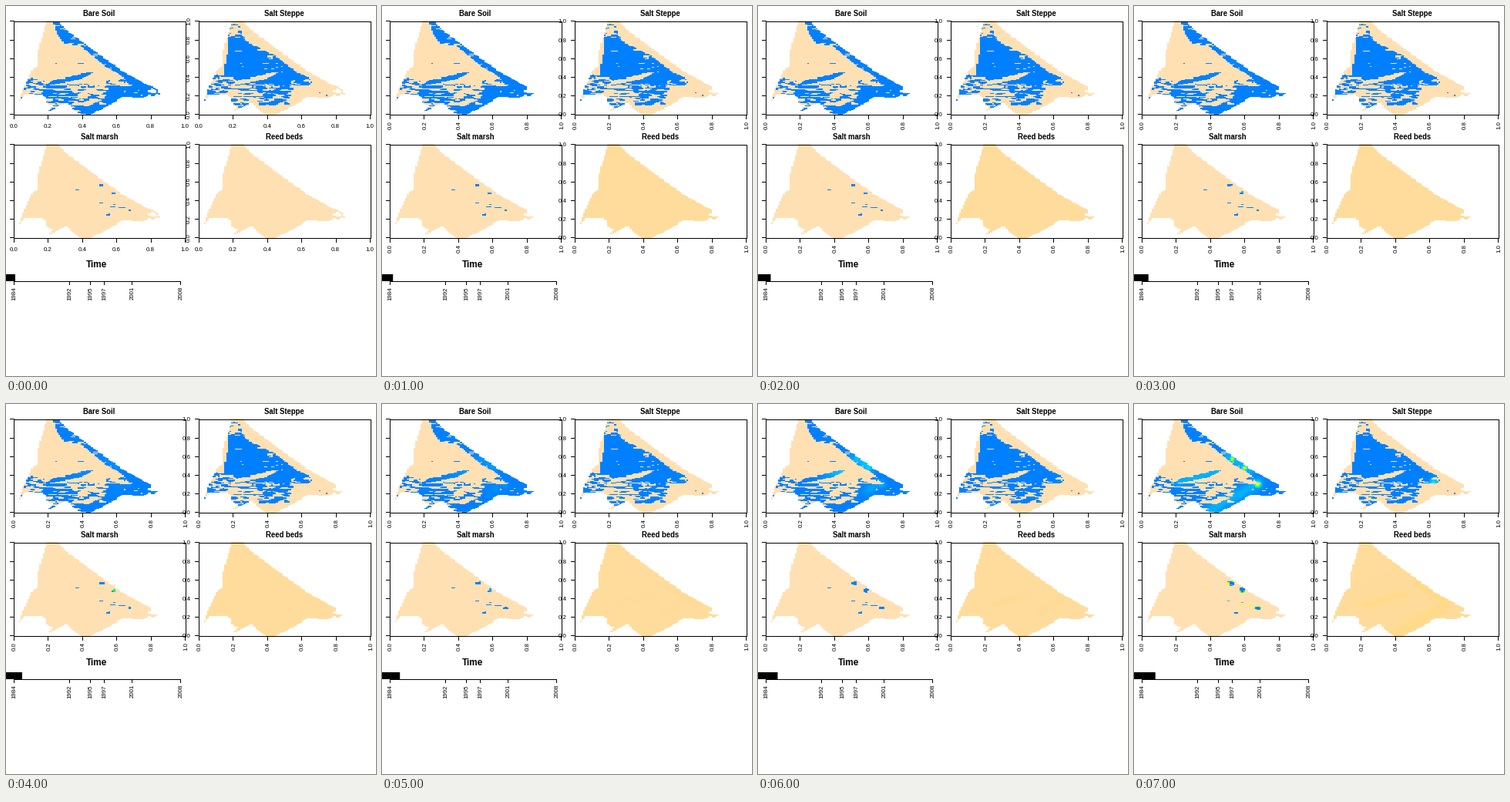
A matplotlib script for the animation above (8000 ms loop, 480 by 480 pixels).

```python
import numpy as np
import matplotlib
import matplotlib.pyplot as plt
from matplotlib.animation import FuncAnimation
from matplotlib.patches import Rectangle
from matplotlib.path import Path

matplotlib.rcParams["font.family"] = "Liberation Sans"

PT = 0.75            # points per pixel at 96 dpi
STEPS, STEP_MS = 8, 1000
N = 100              # raster cells per side
LEFT, RIGHT, TOP, BOTTOM = 9.5, 232.5, 19, 141
PANELS = [("Bare Soil", 0, 0), ("Salt Steppe", 240, 0),
          ("Salt marsh", 0, 160), ("Reed beds", 240, 160)]
YEARS = [1984, 1992, 1995, 1997, 2001, 2008]


def rgb(code):
    return np.array(matplotlib.colors.to_rgb(code))


SAND, REED, REED_DENSE = rgb("#ffe0b3"), rgb("#ffdc9c"), rgb("#ffd980")

# Heat ramp from blue through cyan and green to yellow
RAMP = np.array([rgb(c) for c in ("#0080ff", "#00e5ff", "#00ff4d", "#e6ff00", "#ffff00")])
RAMP_AT = [0, 0.3, 0.5, 0.75, 1]

fig = plt.figure(figsize=(5, 5), dpi=96, facecolor="white")
ax = fig.add_axes([0, 0, 1, 1])

# Cell centres in pixels of the first panel
cell_w, cell_h = (RIGHT - LEFT) / N, (BOTTOM - TOP) / N
X, Y = np.meshgrid(LEFT + (np.arange(N) + 0.5) * cell_w,
                   TOP + (np.arange(N) + 0.5) * cell_h)
CELLS = np.column_stack([X.ravel(), Y.ravel()])


def area(*points):
    return Path(points).contains_points(CELLS).reshape(N, N)


def band(x0, y0, x1, y1, width):
    """Soft ridge along a segment, 1 on the line."""
    dx, dy = x1 - x0, y1 - y0
    t = np.clip(((X - x0) * dx + (Y - y0) * dy) / (dx * dx + dy * dy + 1e-9), 0, 1)
    dist = np.hypot(X - x0 - t * dx, Y - y0 - t * dy)
    return np.exp(-(dist / width) ** 2)


def blob(x, y, radius):
    return band(x, y, x, y, radius)


def highest(*fields):
    return np.maximum.reduce(fields)


def streaks(seed):
    """Uniform noise, correlated mostly along rows."""
    raw = np.random.RandomState(seed).normal(size=(N, N + 4))
    soft = sum(raw[:, k:k + N] * w for k, w in enumerate([0.6, 1, 1, 1, 0.6]))
    soft = soft + 0.45 * np.roll(soft, 1, axis=0)
    return soft.ravel().argsort().argsort().reshape(N, N) / N ** 2


def heat_rgb(heat):
    return np.stack([np.interp(heat, RAMP_AT, RAMP[:, c]) for c in range(3)], axis=-1)


def paint(mask, heat, ground):
    return np.where(mask[..., None], heat_rgb(heat), ground)


land = area(
    (53, 18), (65, 18), (76, 30), (95, 44), (119, 62), (150, 84), (187, 105),
    (187, 109), (184, 110), (185, 112), (192, 113), (198, 113), (191, 117),
    (186, 115), (178, 119), (151, 118), (133, 129), (107, 142), (97, 141),
    (84, 132), (80, 126), (75, 127), (63, 133), (52, 138), (61, 130),
    (53, 126), (51, 118), (46, 115), (23, 116), (17, 123), (20, 112),
    (33, 83), (41, 78), (41, 59), (47, 39))
spit = highest(band(187, 105, 195, 109, 1.4), band(195, 109, 197, 114, 1.4)) > 0.45

# Chance of cover per cell, later zones overriding earlier ones
bare_p, steppe_p = np.zeros((2, N, N))


def fill(chances, value, *points):
    chances[area(*points)] = value


fill(bare_p, 0.36, (14, 125), (24, 93), (48, 92), (52, 122))
fill(bare_p, 0.56, (45, 104), (78, 103), (100, 118), (100, 142), (45, 142))
fill(bare_p, 0.28, (78, 100), (135, 102), (140, 122), (98, 124))
fill(bare_p, 0.42, (130, 94), (162, 95), (164, 106), (130, 107))
fill(bare_p, 0.96, (48, 104), (62, 96), (100, 87), (113, 86), (96, 95), (60, 102))
fill(bare_p, 0.90, (61, 21), (70, 22), (200, 104), (187, 112), (160, 102),
     (148, 89), (128, 78), (95, 51), (75, 49), (65, 35))
fill(bare_p, 0.97, (132, 106), (160, 104), (166, 101), (200, 108), (200, 120),
     (152, 119), (110, 145), (84, 128), (106, 130), (128, 120))

fill(steppe_p, 0.72, (14, 125), (24, 92), (48, 84), (52, 122))
fill(steppe_p, 0.84, (45, 96), (146, 96), (142, 114), (125, 130), (82, 128), (45, 140))
fill(steppe_p, 0.16, (140, 96), (165, 98), (187, 114), (178, 121), (140, 121))
fill(steppe_p, 0.62, (52, 24), (60, 22), (70, 40), (70, 48), (46, 48))
fill(steppe_p, 0.98, (48, 42), (66, 40), (75, 48), (108, 64), (138, 87), (156, 93),
     (152, 101), (112, 103), (60, 98), (42, 86), (46, 66))

bare = streaks(5) < bare_p
for x, y in [(64, 75), (94, 74), (98, 75)]:
    bare |= (abs(X - x) < 2) & (abs(Y - y) < 0.7)
bare |= spit
steppe = (streaks(11) < steppe_p) & ~bare

# Marsh patches: left, top, width
marsh = np.zeros((N, N), bool)
for x, y, w in [(89, 77, 5), (121, 72, 4), (137, 82, 4), (121, 94.5, 4), (138, 97, 3),
                (135, 99, 5), (146, 100.5, 8), (158, 104, 4), (132, 109, 3), (129, 110, 5)]:
    marsh |= (X >= x) & (X < x + w) & (Y >= y) & (Y < y + 1.7)


def oval(x, y, rx, ry):
    return np.hypot((X - x) / rx, (Y - y) / ry)


# Relative distance from the nearest spreading marsh centre
spread = np.minimum.reduce([oval(125.5, 72.5, 4, 4), oval(140, 81.5, 3.5, 4.5),
                            oval(160, 104.5, 6, 2)])
REACH = [0, 0, 0, 0.3, 0.4, 0.5, 0.7, 1]
fresh = streaks(3)

streak = band(58, 101, 112, 87, 6)
shore = band(122, 68, 150, 86, 7)
slope = band(98, 138, 160, 103, 8)
spots = highest(blob(127, 71.5, 4), blob(143, 83, 4), blob(160, 104, 5))
core = highest(blob(110, 88, 22), blob(138, 77, 14), blob(145, 107, 12))
reed_thin = highest(band(60, 102, 110, 87, 1.2), band(125, 112, 160, 90, 1.2),
                    band(135, 78, 160, 90, 1.2))
reed_wide = highest(streak, slope, band(125, 70, 165, 98, 6))


def bare_heat(step):
    if step == STEPS - 1:
        return highest(0.15 * highest(streak, shore, slope), 0.9 * spots ** 1.5)
    rise = [0, 0, 0, 0.02, 0.04, 0.07, 0.2][step]
    return rise * (highest(streak, shore, slope * 0.6) * core + 0.6 * spots)


def steppe_heat(step):
    return 0.3 * blob(148, 102, 5) * (step == 7) + 0.03 * blob(152, 100, 9) * (step >= 5)


def marsh_layer(step):
    grown = spread < REACH[step]
    if step == 7:
        heat = np.where(fresh < 0.55, np.clip(2.2 * (spread - 0.45), 0, 0.9), 0)
        heat = highest(heat, 0.25 * blob(123, 95, 2), 0.2 * blob(140, 98, 2))
    else:
        sprout = {3: 0.2, 4: 0.5, 5: 0.1}.get(step, 0)
        heat = sprout * (grown & (abs(X - 139.5) < 3))
    return paint(marsh | grown, heat, SAND)


def reed_layer(step):
    if step == 0:
        return np.broadcast_to(SAND, (N, N, 3))
    dense = {5: 0.2 * reed_thin, 6: 0.6 * reed_thin, 7: 0.65 * reed_wide}.get(step, 0 * X)
    return REED + dense[..., None] * (REED_DENSE - REED)


def layers(step):
    shown = land | spit if step == 0 else land
    maps = [paint(bare, bare_heat(step), SAND),
            paint(steppe, steppe_heat(step), SAND),
            marsh_layer(step),
            reed_layer(step)]
    return [np.where(shown[..., None], m, 1.0) for m in maps]


def line(xs, ys):
    ax.plot(xs, ys, color="black", lw=PT, solid_capstyle="projecting", zorder=3)


def label(x, y, text, size=7.92, **style):
    return ax.text(x, y, text, fontsize=size * PT, va="baseline",
                   rotation_mode="anchor", zorder=4, **style)


images, first_labels, later_labels = [], [], []
for title, ox, oy in PANELS:
    l, r, t, b = LEFT + ox, RIGHT + ox, TOP + 0.5 + oy, BOTTOM - 0.5 + oy
    images.append(ax.imshow(np.ones((N, N, 3)), extent=(l, r, BOTTOM + oy, TOP + oy),
                            interpolation="nearest", aspect="auto", zorder=1))
    line([l, r, r, l, l], [t, t, b, b, t])
    label(121 + ox, 13 + oy, title, 9.5, ha="center", weight="bold")
    for k in range(6):
        x, y, text = 10 + ox + 44.4 * k, 140.4 + oy - 24.2 * k, f"{k / 5:.1f}"
        line([x, x], [b, b + 5])
        line([l, l - 5], [y, y])
        first_labels += [label(x, b + 17.5, text, ha="center"),
                         label(l - 10.5, y, text, ha="center", rotation=90)]
        later_labels += [label(x + 3, b + 9, text, ha="right", rotation=90),
                         label(l - 10, y + 3, text, ha="right")]

label(117.5, 339, "Time", 11.7, ha="center", weight="bold")
line([9.5, 225.5], [356.5, 356.5])
for year in YEARS:
    x = 9.5 + 9 * (year - 1984)
    line([x, x], [356.5, 361])
    label(x + 3, 364, str(year), ha="right", rotation=90)

bar = Rectangle((0, 348), 12, 9, color="black", lw=0, snap=False, zorder=3)
ax.add_patch(bar)

ax.set_xlim(0, 480)
ax.set_ylim(480, 0)
ax.axis("off")


def draw(step):
    for image, data in zip(images, layers(step)):
        image.set_data(data)
    for text in first_labels:
        text.set_visible(step == 0)
    for text in later_labels:
        text.set_visible(step > 0)
    bar.set_width(12 + 2.25 * step)
    return images + [bar]


anim = FuncAnimation(fig, draw, frames=STEPS, interval=STEP_MS, repeat=True, blit=False)
plt.show()
```
